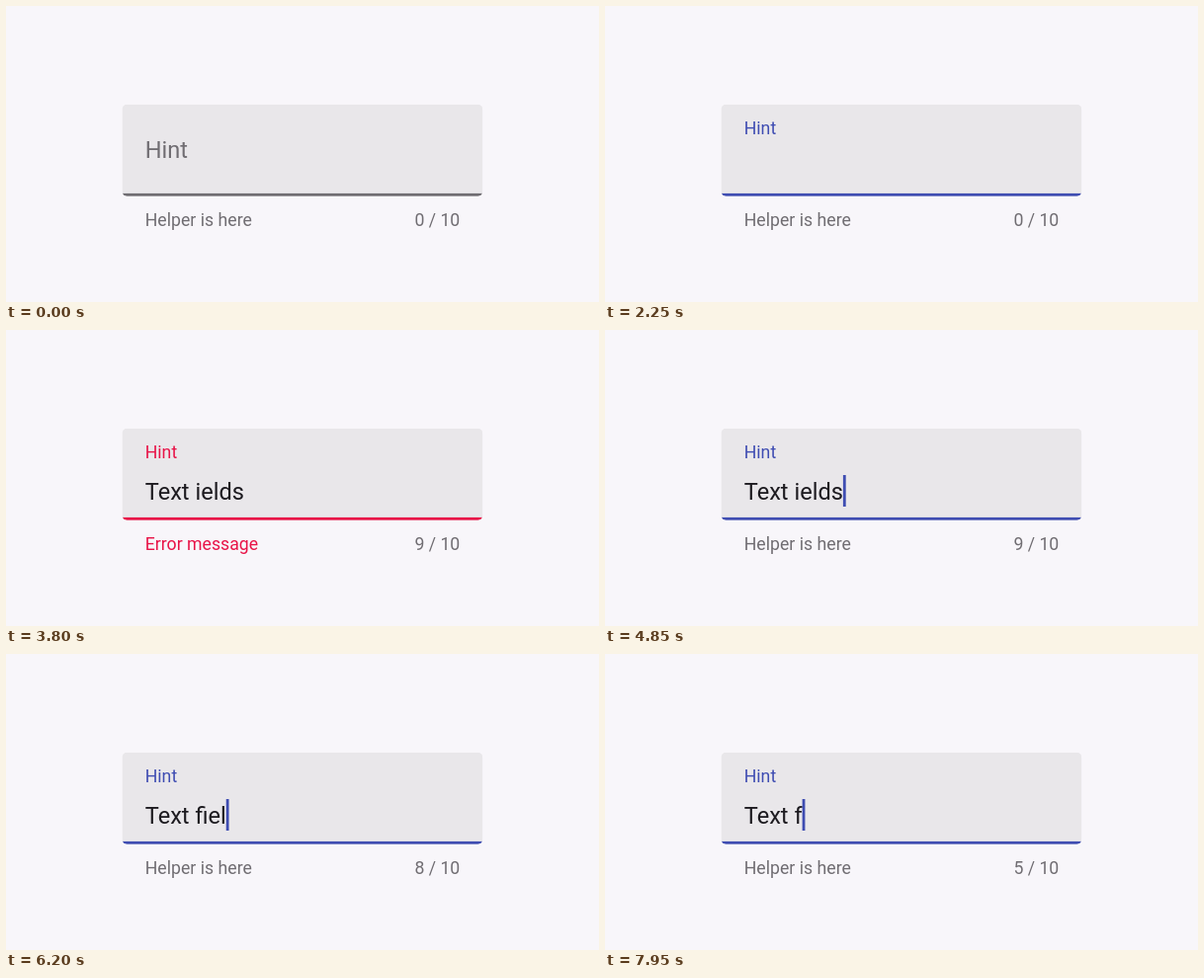
Animation, 600 px wide and 300 px high, one loop 8 s. Source, as an HTML page with a canvas:

```html
<!DOCTYPE html>
<html lang="en">
<head>
<meta charset="utf-8">
<title>Text field</title>
<style>
html, body { margin: 0; width: 100%; height: 100%; overflow: hidden; background: #f8f6fa; }
canvas { display: block; width: 600px; height: 300px; }
</style>
</head>
<body>
<canvas id="stage"></canvas>
<script>
const LOOP = 8000;
const FONT = 'Roboto, Arial, sans-serif';
const BIG = 23.6, SMALL = 17.7, LEFT = 140.7, RIGHT = 459.3;
const GREY = [112, 109, 114], BLUE = [63, 77, 178], RED = [232, 20, 72];
const FILL = [233, 231, 234], PRESSED = [229, 228, 231];
const BOX = { x: 117.5, y: 99.7, w: 364.8, h: 93.1 };

// Typing runs: when each key lands, and what it leaves in the field.
const keys = [];
function type(from, text, times) {
  times.forEach((at, i) => keys.push({ at, text: from + text.slice(0, i + 1) }));
}
function erase(text, times) {
  times.forEach((at, i) => keys.push({ at, text: text.slice(0, -1 - i) }));
}
type('', 'Text ields', [2300, 2500, 2600, 2700, 2800, 2900, 3000, 3100, 3300, 3400]);
erase('Text ields', [4950, 5050, 5150, 5250, 5350]);
type('Text ', 'fields', [5800, 5900, 6000, 6200, 6300, 6400]);
erase('Text fields', [7450, 7650, 7750, 7850, 7950]);

// Spans in which the caret is hidden after focus.
const hidden = [[1650, 1900], [2050, 2300], [3600, 4750], [5500, 5800], [6500, 6800], [6950, 7250]];
const FOCUS = 850, CARET = 1450, ERROR = 3800, CLEARED = 4650;

const canvas = document.getElementById('stage');
const ctx = canvas.getContext('2d');
const ratio = window.devicePixelRatio || 1;
canvas.width = 600 * ratio;
canvas.height = 300 * ratio;
ctx.scale(ratio, ratio);

const clamp = v => Math.max(0, Math.min(1, v));
const span = (t, a, b) => clamp((t - a) / (b - a));
const ease = v => v * v * (3 - 2 * v);
const lerp = (a, b, v) => a + (b - a) * v;
const mix = (a, b, v) => `rgb(${a.map((c, i) => Math.round(lerp(c, b[i], v)))})`;

function write(text, x, y, size, color, align = 'left') {
  ctx.font = `${size}px ${FONT}`;
  ctx.fillStyle = color;
  ctx.textAlign = align;
  ctx.fillText(text, x, y);
}

function drawBox(t, line, focus) {
  const press = span(t, FOCUS, 1150) * (1 - span(t, 1450, 2250));
  ctx.save();
  ctx.beginPath();
  ctx.roundRect(BOX.x, BOX.y, BOX.w, BOX.h, 5);
  ctx.clip();
  ctx.fillStyle = mix(FILL, PRESSED, press);
  ctx.fillRect(BOX.x, BOX.y, BOX.w, BOX.h);
  ctx.fillStyle = mix(GREY, line, focus);
  ctx.fillRect(BOX.x, 189.9, BOX.w, 3);
  ctx.restore();
}

function draw(t) {
  const focus = ease(span(t, FOCUS, 1150));
  const error = t >= ERROR && t < CLEARED;
  const accent = error ? RED : BLUE;
  const text = keys.reduce((last, key) => key.at <= t ? key.text : last, '');
  const count = text.replace(' ', '').length;

  ctx.fillStyle = '#f8f6fa';
  ctx.fillRect(0, 0, 600, 300);
  drawBox(t, accent, focus);
  write('Hint', LEFT, lerp(154.4, 130.4, focus), lerp(BIG, SMALL, focus), mix(GREY, accent, focus));
  write(error ? 'Error message' : 'Helper is here', LEFT, 223.2, SMALL, mix(GREY, RED, +error));
  write(`${count} / 10`, RIGHT, 223.2, SMALL, mix(GREY, GREY, 0), 'right');
  write(text, LEFT, 171.8, BIG, '#1c1a1f');

  if (t >= CARET && !hidden.some(([a, b]) => t >= a && t < b)) {
    ctx.fillStyle = mix(BLUE, BLUE, 0);
    ctx.fillRect(LEFT + ctx.measureText(text).width, 147, 2.8, 32);
  }
}

const start = performance.now();
function frame() {
  draw((performance.now() - start) % LOOP);
  requestAnimationFrame(frame);
}
frame();
</script>
</body>
</html>
```
